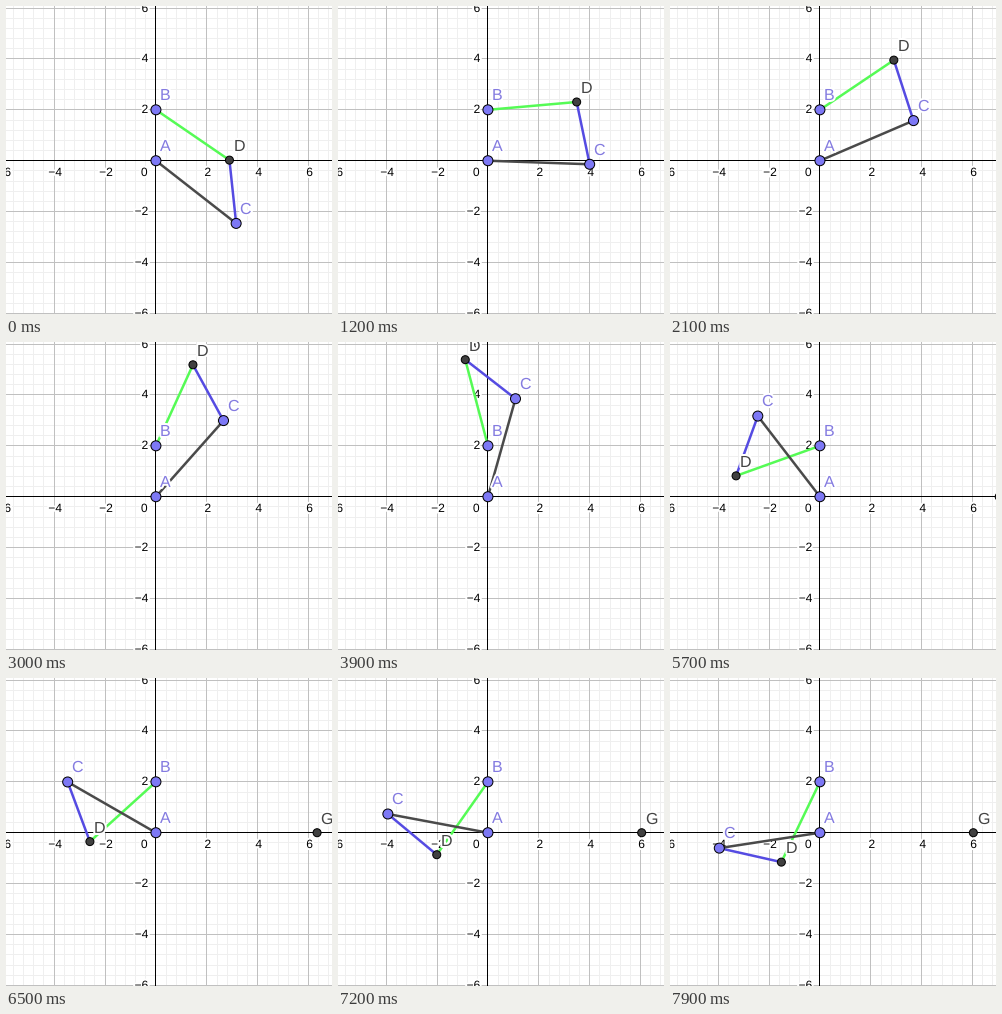
Animation, 326 px wide and 308 px high, one loop 8 s. Source, as a matplotlib script:

```python
import matplotlib.pyplot as plt
import matplotlib.patheffects as pe
import numpy as np
from matplotlib.animation import FuncAnimation
from matplotlib.patches import Circle

W, H, DPI = 326, 308, 64
PT = 72 / DPI                          # points per pixel
OX, OY, UNIT = 149.93, 154.72, 25.45   # origin and scale in pixels
FRAMES = 80

CRANK, ROCKER, COUPLER, ROD = 4, 3.5, 2.5, 10
PIVOT = np.array([0.0, 2.0])

# Crank angle in degrees; the drive speed wavers slightly.
KEY_T = [0, 12, 30, 47, 57, 65, 79]
KEY_ANGLE = [-38, -2, 48.4, 97.3, 127.6, 150.1, 188.7]

VIOLET, VIOLET_TEXT = "#7d78f5", "#847be0"
DARK, DARK_TEXT = "#404040", "#444444"
HALO = [pe.withStroke(linewidth=4 * PT, foreground="white")]

plt.rcParams["font.family"] = "Liberation Sans"
fig = plt.figure(figsize=(W / DPI, H / DPI), dpi=DPI, facecolor="white")
ax = fig.add_axes([0, 0, 1, 1])
ax.set(xlim=(0, W), ylim=(H, 0))
ax.axis("off")


def to_px(p):
    return OX + UNIT * p[0], OY - UNIT * p[1]


def write(x, y, s, size, color, z, ha="left"):
    return ax.text(x, y, s, fontsize=size * PT, color=color, ha=ha,
                   va="baseline", zorder=z, path_effects=HALO)


def rule(value, color, z):
    # Whole numbers snap to the centre of that pixel row or column.
    x, y = np.floor(to_px((value, value)))
    ax.plot([x, x], [0, H], color=color, lw=PT, zorder=z)
    ax.plot([0, W], [y, y], color=color, lw=PT, zorder=z)


def draw_grid():
    for k in range(-17, 18):
        if k % 5:
            rule(0.4 * k, "#efefef", 0)
    for v in range(-6, 7, 2):
        rule(v, "#c0c0c0" if v else "black", 1 if v else 2)
        if v:
            x, y = to_px((v, v))
            s = str(v).replace("-", "\u2212")
            write(x + 1, 170, s, 12, "black", 3, "center")
            write(142.3, np.floor(y) + 4, s, 12, "black", 3, "right")
    write(138.3, 170, "0", 12, "black", 3, "center")


class Joint:
    def __init__(self, name, free):
        fill, ink = (VIOLET, VIOLET_TEXT) if free else (DARK, DARK_TEXT)
        self.lift = 9.7 if free else 8.7
        self.dot = ax.add_patch(Circle((0, 0), 5 if free else 4, fc=fill,
                                       ec="black", lw=PT, zorder=6))
        self.label = write(0, 0, name, 16, ink, 7)
        self.label.set_clip_on(True)

    def move(self, p):
        x, y = to_px(p)
        self.dot.set_center((x, y))
        self.label.set_position((np.rint(x + 4.2), np.rint(y - self.lift)))


def segment(color, z):
    return ax.plot([], [], color=color, lw=2.5 * PT, zorder=z,
                   solid_capstyle="butt")[0]


def solve(i):
    t = np.radians(np.interp(i, KEY_T, KEY_ANGLE))
    c = CRANK * np.array([np.cos(t), np.sin(t)])
    # Left-hand intersection of the circles around the pivot and the crank end.
    gap = c - PIVOT
    d = np.hypot(*gap)
    u = gap / d
    along = (ROCKER**2 - COUPLER**2 + d**2) / (2 * d)
    side = np.sqrt(max(ROCKER**2 - along**2, 0))
    joint = PIVOT + along * u + side * np.array([-u[1], u[0]])
    slider = c[0] + np.sqrt(ROD**2 - c[1]**2), 0
    return {"A": (0, 0), "B": PIVOT, "C": c, "D": joint, "G": slider}


draw_grid()
bars = {"BD": segment("#55fb55", 4), "CD": segment("#554be2", 4.1),
        "AC": segment("#4a4a4a", 4.2)}
joints = {name: Joint(name, name in "ABC") for name in "ABCDG"}


def update(i):
    pos = solve(i)
    for name, joint in joints.items():
        joint.move(pos[name])
    for (a, b), bar in bars.items():
        bar.set_data(*zip(to_px(pos[a]), to_px(pos[b])))
    return []


anim = FuncAnimation(fig, update, frames=FRAMES, interval=100,
                     repeat=True, repeat_delay=0, blit=False)
plt.show()
```
